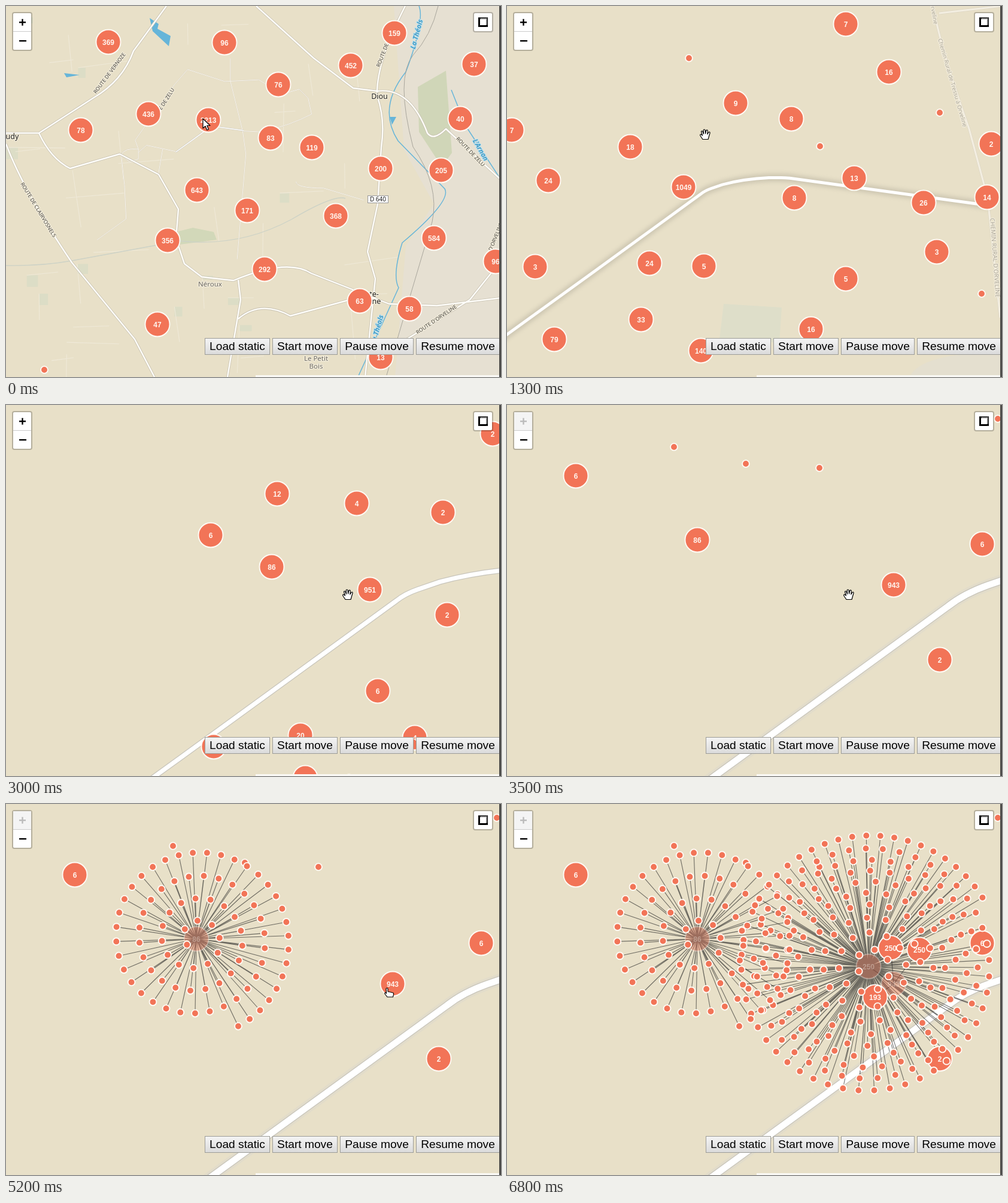
Recreate the animation shown at these times as an HTML page with a canvas. Size 827 by 619 pixels, loop 7200 ms.

```html
<!DOCTYPE html>
<html lang="fr">
<head>
<meta charset="utf-8">
<style>
html, body { margin: 0; width: 100%; height: 100%; overflow: hidden; background: #e8e0c8; }
canvas { display: block; }
</style>
</head>
<body>
<canvas id="stage" width="827" height="619"></canvas>
<script>
const ctx = document.getElementById('stage').getContext('2d');
const LOOP = 7200, STEP = 100;
const SANS = '"Liberation Sans", Arial, sans-serif', MAP = '"Noto Sans", sans-serif';
const BASE = '#e8e0c8', CORAL = '#f27457', WATER = '#66b5d9', FIELD = '#dcddc6';

const progress = (t, from, to) => Math.max(0, Math.min(1, (t - from) / (to - from)));
const easeOut = k => 1 - (1 - k) ** 1.57;

// The map zooms around a point or is dragged; a view is [scale, x, y] from world to screen.
const cameraMoves = [
  { from: 500, to: 900, zoom: 1, x: 331, y: 190.5 },
  { from: 900, to: 1300, zoom: 2, x: 348.3, y: 189 },
  { from: 1700, to: 2000, zoom: 1, x: 290, y: 305 },
  { from: 2300, to: 3000, dx: 295, dy: 4 },
  { from: 3000, to: 3300, zoom: 1, x: 570, y: 315.5 }
];

function viewAt(t) {
  let [s, x, y] = [1, 0, 0];
  for (const m of cameraMoves) {
    const k = easeOut(progress(t, m.from, m.to));
    if (m.zoom) {
      const f = 2 ** (m.zoom * k);
      [s, x, y] = [s * f, m.x + (x - m.x) * f, m.y + (y - m.y) * f];
    } else [x, y] = [x + m.dx * k, y + m.dy * k];
  }
  return [s, x, y];
}
const [far, mid, near, close, deep] = [0, 800, 1300, 2000, 3300].map(viewAt);

// Markers on screen once a view has settled: x, y, count (none for a single point).
const groups = [
  { until: 1200, space: far, marks: [[171, 60, 369], [365, 61, 96], [649, 45, 159], [576, 99, 452],
    [782, 97, 37], [455, 131, 76], [238, 180, 436], [338, 190, 2213], [125, 207, 78], [442, 220, 83],
    [511, 236, 119], [759, 188, 40], [626, 271, 200], [727, 274, 205], [319, 307, 643], [403, 341, 171],
    [551, 350, 368], [715, 387, 584], [270, 391, 356], [818, 426, 96], [432, 439, 292], [591, 492, 63],
    [674, 505, 58], [253, 531, 47], [626, 586, 13], [64, 607]] },
  { until: 2000, space: near, marks: [[566, 30, 7], [304, 87], [638, 110, 16], [382, 162, 9], [475, 188, 8],
    [723, 178], [8, 207, 7], [206, 235, 18], [523, 234], [809, 230, 2], [69, 291, 24], [295, 302, 1049],
    [580, 287, 13], [480, 320, 8], [696, 328, 26], [802, 319, 14], [718, 410, 3], [47, 435, 3],
    [238, 429, 24], [329, 434, 5], [566, 455, 5], [793, 480], [224, 523, 33], [508, 539, 16],
    [79, 556, 79], [324, 575, 140]] },
  { until: 3300, space: close, marks: [[518, 44, 2], [654, 100, 6], [754, 164], [158, 144, 12], [291, 160, 4],
    [435, 175, 2], [47, 213, 6], [149, 266, 86], [313, 304, 951], [442, 346, 2], [668, 336, 8],
    [765, 378, 3], [326, 473, 6], [197, 547, 20], [388, 551, 4], [52, 566, 2], [205, 618, 2], [278, 618]] },
  { until: LOOP, space: deep, marks: [[115, 118, 6], [318, 225, 86], [794, 232, 6], [646, 300, 943],
    [723, 425, 2], [279, 70], [399, 98], [522, 105], [820, 23]] }
];

const roads = [
  'M0 212H55L145 154Q195 125 213 75L268 0',
  'M55 212Q75 255 107 271L190 247L255 281L288 339L284 388L298 430L327 452L380 458Q470 420 510 446L640 497L720 500L827 487',
  'M0 230Q30 310 110 428L215 556L248 619',
  'M418 0L514 87L580 137L620 142Q675 135 704 212Q714 226 735 205L827 290',
  'M667 0Q618 95 620 150Q634 190 627 235L621 330L604 410L617 455L600 619',
  'M388 457L392 490L370 619M388 522Q425 490 475 517L575 490',
  'M655 565L775 490L827 425'
].map(d => new Path2D(d));
const lanes = new Path2D('M128 280L118 252L240 80L280 34L395 71L500 66L572 110L625 95L652 122L663 172Q600 205 510 227L450 224'
  + 'M75 297Q85 275 128 280V310L102 320ZL85 390L90 495L0 560M128 290L153 268L243 287M203 280L190 355M615 380Q615 400 700 400L824 437'
  + 'M412 0V70L450 224L460 295L433 619');
const mainRoad = new Path2D('M-492 937L0 582L358 322Q372 311 392 304L430 291Q500 272 585 268H625Q640 268 655 269.5L1322 361');
const chemin = new Path2D('M712 0Q724 70 772 205L803 320L824 520M722 12L827 0');
const stream = new Path2D('M0 433Q60 434 110 425L290 392Q390 403 477 356Q548 314 567 321');
const rivers = new Path2D('M690 0Q700 25 668 110Q620 170 655 225L733 305Q745 325 662 395Q645 450 656 470L588 619M744 140L768 200L827 290');
const railway = new Path2D('M722 0Q710 50 680 82Q650 120 680 235Q725 300 712 360L635 619');

function seeded(seed) {
  return () => (seed = seed * 16807 % 2147483647) / 2147483647;
}
const random = seeded(41);

// Faint field boundaries and tinted parcels, all leaning the same way.
const tracks = new Path2D(), parcels = new Path2D();
for (let i = 0; i < 36; i++) {
  const x = random() * 620, y = random() * 600, length = 30 + random() * 70;
  const angle = -.15 + (i % 2) * Math.PI / 2 + random() * .2;
  tracks.moveTo(x, y);
  tracks.lineTo(x + length * Math.cos(angle), y + length * Math.sin(angle));
  if (i % 3 === 0) parcels.rect(x, y, 8 + random() * 14, 6 + random() * 14);
}

// Draw in coordinates of the given space; returns its scale on screen.
function enter(space, view) {
  const k = view[0] / space[0];
  ctx.setTransform(k, 0, 0, k, view[1] - k * space[1], view[2] - k * space[2]);
  return k;
}
const reset = () => ctx.setTransform(1, 0, 0, 1, 0, 0);

function line(path, color, width) {
  ctx.strokeStyle = color;
  ctx.lineWidth = width;
  ctx.stroke(path);
}

function shape(d, color) {
  ctx.fillStyle = color;
  ctx.fill(new Path2D(d));
}

function bar(x, y, w, h, color) {
  ctx.fillStyle = color;
  ctx.fillRect(x, y, w, h);
}

// Text centred on a point, its baseline on a whole pixel.
function text(str, x, y, size, { family = SANS, style = '', color = '#000', angle = 0, halo } = {}) {
  const drop = Math.round(size * .346);
  ctx.save();
  ctx.translate(x, y);
  ctx.rotate(angle * Math.PI / 180);
  ctx.font = `${style} ${size}px ${family}`;
  ctx.textAlign = 'center';
  if (halo) {
    ctx.strokeStyle = halo;
    ctx.lineWidth = 2.5;
    ctx.strokeText(str, 0, drop);
  }
  ctx.fillStyle = color;
  ctx.fillText(str, 0, drop);
  ctx.restore();
}
const street = (str, x, y, angle, size = 8.7, color = '#45433f') =>
  text(str, x, y, size, { family: MAP, color, angle, halo: '#f3eddc' });
const place = (str, x, y, size = 11.5, color = '#6d6a64') =>
  text(str, x, y, size, { family: MAP, color, halo: '#f3eddc' });
const river = (str, x, y, angle) =>
  text(str, x, y, 11.5, { family: MAP, style: 'italic bold', color: '#3f9cc8', angle, halo: '#c4e2ec' });

function terrain(view, z) {
  let k = enter(far, view);
  shape('M648 0L665 240L715 330L668 400L650 619H827V0Z', '#e6e0d2');
  ctx.fillStyle = FIELD;
  ctx.fill(parcels);
  shape('M688 135L735 108L745 245L728 268L690 210Z', '#d0d6b8');
  shape('M288 376L312 370L347 377L352 390L290 398Z', '#d2d8b9');
  shape('M240 20L255 30L253 38L275 50L272 67L245 42ZM97 112L123 115L101 119ZM641 185H652L645 198Z', WATER);
  line(tracks, '#efe9d8', 1.1 / k);
  line(stream, '#cdd2c6', 1.4 / k);
  line(rivers, WATER, 1.5 / k);
  line(railway, '#a9a69c', 1 / k);

  k = enter(mid, view);
  line(lanes, '#d9d2c0', (1.6 + z) / k);
  line(lanes, '#fbf8f0', (.9 + z) / k);
  k = enter(far, view);
  for (const road of roads) line(road, '#c8c2b2', (4 + z) / k);
  for (const road of roads) line(road, '#fffefa', (2.4 + z) / k);
}

function farLabels() {
  street('ROUTE DE VERNOZE', 173, 112, -53);
  street('ROUTE DE ZELU', 262, 165, -58);
  street('ROUTE DE CLAIRVOSNELS', 54, 340, 58.5);
  street('ROUTE DE', 629, 82, -69);
  street('ROUTE DE ZELU', 776, 243, 46);
  street("ROUTE D'ORVELINE", 719, 523, -34);
  street("D'ORVELINE", 818, 385, -68);
  river('La Théols', 686, 47, -75);
  river('La Théols', 620, 540, -74);
  river("L'Arnon", 793, 240, 60);
  place('Diou', 624, 151, 12.5, '#222');
  place('audy', 7, 218, 12.5, '#222');
  place('te-', 615, 481, 12.5, '#222');
  place('ne', 619, 493, 12.5, '#222');
  place('Néroux', 341, 464);
  place('Le Petit', 518, 588);
  place('Bois', 518, 601);
  bar(604, 316, 35, 13, '#999');
  bar(605, 317, 33, 11, '#fff');
  text('D 640', 621.5, 323, 10, { family: MAP, color: '#222' });
}

function midLabels() {
  street('ROUTE DE ZELU', 203, 143, -58);
  street('VERNOZE', 15, 88, -37);
  street('STE-VELORINE', 18, 309, -17);
  place('Prenay', 685, 103);
  place("L'Orme", 803, 69);
  street("Chemin Rural d'Orveline à Tressu", 456, 368, -87, 9.3, '#88857c');
  street("Chemin Rural d'Orveline à Tressu", 441, 563, -85, 9.3, '#88857c');
}

function drawNear(view) {
  const k = enter(near, view);
  shape('M362 497L459 503L455 562L355 556Z', '#dedec9');
  shape('M672 619Q690 585 780 580H827V619Z', '#e4dfcf');
  line(chemin, '#ddd6c3', 4.5 / k);
  line(chemin, '#f3eee1', 3 / k);
  street('Chemin Rural de Tressu à Orveline', 744, 128, 74, 9.5, '#aaa598');
  street('Orveline', 713, 12, 80, 9.5, '#aaa598');
  street("CHEMIN RURAL D'ORVELINE", 815, 420, 86, 10, '#aaa598');
}

function drawMainRoad(t, view, z) {
  const k = enter(close, view), width = 1.5 * 1.48 ** z;
  const loading = [[1000, 1500], [1800, 2300], [3100, 3500]].some(([from, to]) => t >= from && t < to);
  if (loading) {
    ctx.filter = 'blur(3px)';
    line(mainRoad, 'rgba(165,160,145,.38)', width * 2.8 / k);
    ctx.filter = 'blur(0.7px)';
  } else {
    if (z > 4.5) line(mainRoad, 'rgba(215,212,205,.4)', width * 1.9 / k);
    line(mainRoad, '#c8c5bb', (width + (z > 2 ? 2.6 : 1)) / k);
  }
  line(mainRoad, '#fff', width / k);
  ctx.filter = 'none';
}

function drawMap(t, view, z) {
  bar(0, 0, 827, 619, BASE);
  ctx.lineJoin = 'round';
  if (z < 2.2) terrain(view, z);
  else drawNear(view);
  drawMainRoad(t, view, z);

  enter(far, view);
  if (z < .4) farLabels();
  else if (z < 2.2) {
    const stale = { family: MAP, style: 'bold', color: 'rgba(85,85,85,.28)', angle: -58 };
    text('ROUTE DE ZELU', 262, 165, 9, stale);
    text('ROUTE DE VERNOZE', 179, 105, 9, stale);
    enter(mid, view);
    midLabels();
  }
  reset();
}

function marker(x, y, count, alpha = 1) {
  ctx.globalAlpha = alpha;
  ctx.beginPath();
  ctx.arc(x, y, count ? 20.5 : 5.9, 0, 7);
  ctx.fillStyle = CORAL;
  ctx.fill();
  ctx.strokeStyle = '#fffaf4';
  ctx.lineWidth = 1.9;
  ctx.stroke();
  if (count) text(count, x, y + 1, 12, { style: 'bold', color: '#fff5ee' });
  ctx.globalAlpha = 1;
}

function spiral(cx, cy, count) {
  const feet = [];
  let angle = 0, leg = 11;
  for (let i = count; i >= 0; i--) {
    if (i < count) feet.push([cx + .8 * leg * Math.cos(angle), cy + .8 * leg * Math.sin(angle)]);
    angle += 28 / leg + i * .0005;
    leg += 10 * Math.PI / angle;
  }
  return feet;
}

// One path for all legs, so that crossings do not darken.
function legs(cx, cy, feet) {
  const path = new Path2D();
  for (const [x, y] of feet) {
    path.moveTo(cx, cy);
    path.lineTo(x, y);
  }
  line(path, 'rgba(34,34,34,.62)', 1.1);
}

const smallSpider = spiral(318, 225, 86), bigSpider = spiral(604, 271, 250);
const pieces = [[641, 240, 250], [689, 243, 250], [615, 322, 193]];

function drawMarkers(t, view) {
  const { space, marks } = groups.find(g => t < g.until);
  const k = view[0] / space[0], open = t >= 4700, split = t >= 6100;
  if (open) legs(318, 225, smallSpider);
  if (split) {
    legs(646, 300, [...pieces, [604, 271]]);
    legs(604, 271, bigSpider);
  }
  for (const [x, y, n] of marks) {
    const faded = open && n === 86 || split && n === 943;
    marker(k * (x - space[1]) + view[1], k * (y - space[2]) + view[2], n, faded ? .35 : 1);
  }
  if (split) {
    marker(604, 271, 250, .35);
    for (const p of [...pieces, ...bigSpider]) marker(...p);
  }
  if (open) for (const p of smallSpider) marker(...p);
}

function panel(x, y, w, h) {
  for (const [inset, color] of [[0, 'rgba(0,0,0,.22)'], [2, '#fff']]) {
    ctx.beginPath();
    ctx.roundRect(x + inset, y + inset, w - 2 * inset, h - 2 * inset, 4 - inset);
    ctx.fillStyle = color;
    ctx.fill();
  }
}

function drawControls(t) {
  const maxed = t >= 3300, ink = maxed ? '#bbb' : '#000';
  panel(10, 10, 34, 65);
  if (maxed) bar(12, 12, 30, 30, '#f4f4f4');
  bar(12, 42, 30, 1, '#ccc');
  bar(22, 26, 11, 2.4, ink);
  bar(26.3, 21.7, 2.4, 11, ink);
  bar(22, 57, 12, 2.4, '#000');

  panel(780, 10, 34, 34);
  bar(789, 19, 3, 16, '#000');
  bar(789, 32, 16, 3, '#000');
  bar(789, 19, 16, 1, '#000');
  bar(804, 19, 1, 16, '#000');
  for (let i = 0; i < 12; i += 2) {
    bar(792 + i, 20, 1, 2, '#000');
    bar(802, 21 + i, 2, 1, '#000');
  }

  const shade = ctx.createLinearGradient(0, 554, 0, 582);
  shade.addColorStop(0, '#f5f5f5');
  shade.addColorStop(1, '#dadada');
  let x = 332;
  for (const name of ['Load static', 'Start move', 'Pause move', 'Resume move']) {
    ctx.font = '19.2px ' + SANS;
    const w = Math.round(ctx.measureText(name).width) + 16;
    bar(x, 554, w, 28, '#9c9c98');
    bar(x + 1, 555, w - 2, 26, shade);
    text(name, x + w / 2, 567, 19.2);
    x += w + 4;
  }
  bar(417, 616, 407, 3, '#fbfaf6');
  bar(824, 0, 3, 619, '#4c4b49');
}

// Cursor moves: start, end, and the glyph's top left corner on arrival.
const cursorMoves = [[0, 100, 325, 188], [500, 800, 336, 188], [800, 1300, 322, 205], [1300, 1600, 285, 300],
  [2300, 3000, 562, 307], [3600, 4100, 396, 236], [4200, 4400, 314, 217], [4600, 4700, 368, 218],
  [4800, 5100, 694, 325], [5100, 5200, 632, 306], [5400, 5800, 633, 288], [6200, 6800, -20, -20]];
const glyphs = {
  arrow: new Path2D('M0 0V16L4 12.5L6.8 19L9.5 17.8L6.8 11.5H12Z'),
  finger: new Path2D('M3 2Q4.5 0 6 2V7L13 8.5Q16 9 15.5 11.5L14.5 16H5L.8 10.5Q.5 8 2.5 9L3.5 10Z'),
  hand: new Path2D('M5 17.5L1 11.5Q0 9 2 9L4.5 11L2.5 4.5Q3.5 2.5 5 4.5L6.5 8.5L6.2 2Q7.5 0 9 2L9.5 8L10.7 2.5Q12.5 1 13.3 3L12.8 9L15 5.5Q17.5 4.5 17 7L14 17.5Z')
};

function drawCursor(t) {
  let [x, y] = [329, 188];
  for (const [from, to, toX, toY] of cursorMoves) {
    const k = progress(t, from, to);
    x += (toX - x) * k;
    y += (toY - y) * k;
  }
  const onCluster = t < 1100 || t >= 1600 && t <= 2300 || t >= 4400 && t < 4700 || t >= 5200 && t < 6300;
  const glyph = glyphs[t < 100 ? 'arrow' : onCluster ? 'finger' : 'hand'];
  ctx.save();
  ctx.translate(x, y);
  ctx.fillStyle = '#fff';
  ctx.fill(glyph);
  line(glyph, '#000', 1.2);
  ctx.restore();
}

function frame() {
  const t = Math.floor(performance.now() % LOOP / STEP) * STEP;
  const view = viewAt(t);
  reset();
  drawMap(t, view, Math.log2(view[0]));
  drawMarkers(t, view);
  drawControls(t);
  drawCursor(t);
  requestAnimationFrame(frame);
}
frame();
</script>
</body>
</html>
```
